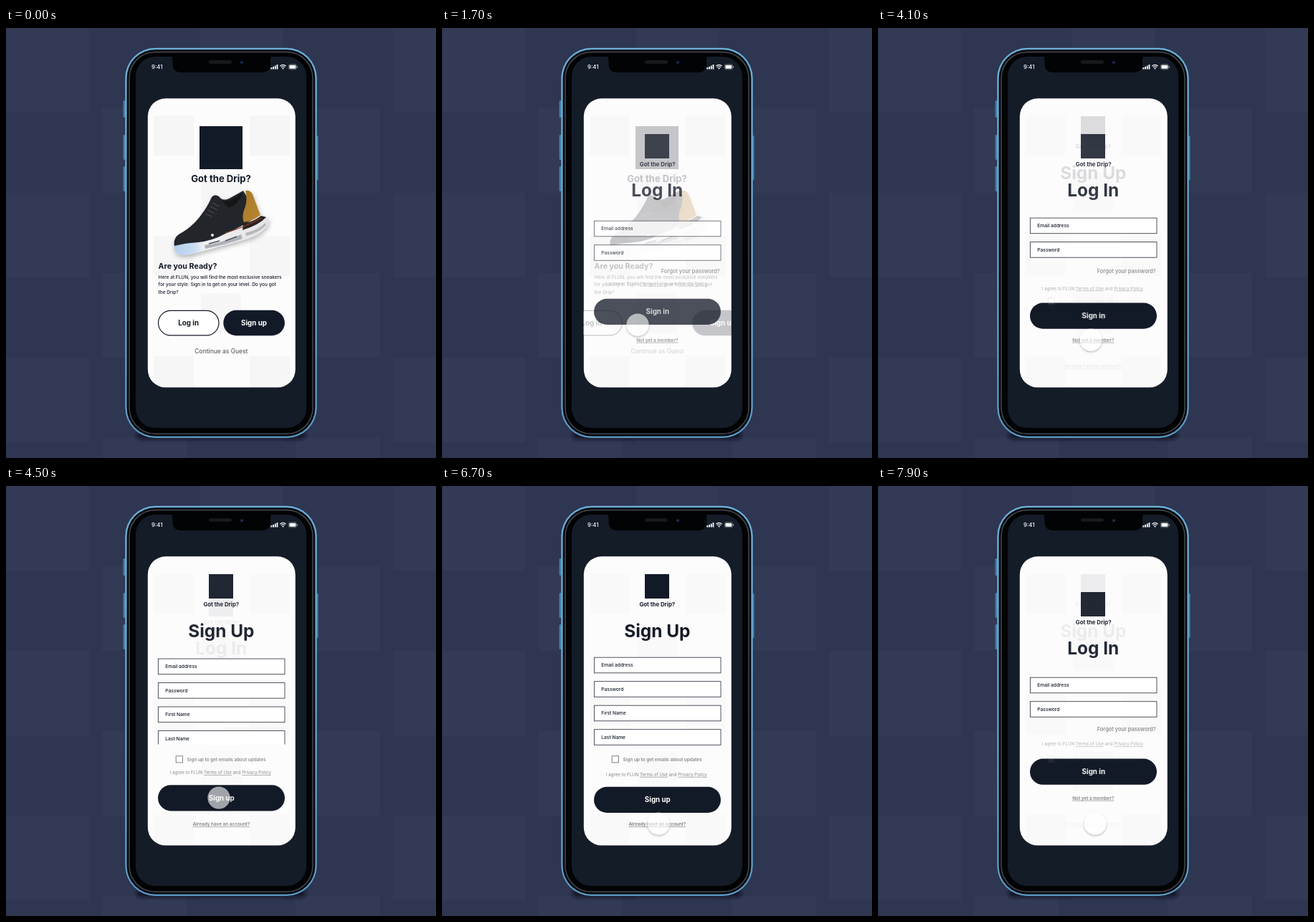
An HTML page that plays this animation: 600 px wide and 600 px high, repeating every 8 s.

```html
<!DOCTYPE html>
<html lang="en">
<head>
<meta charset="utf-8">
<title>Sneaker app sign in</title>
<style>
  /* --welcome: share of the first screen, --up: share of the sign-up form */
  @property --welcome { syntax: "<number>"; inherits: true; initial-value: 1; }
  @property --up { syntax: "<number>"; inherits: true; initial-value: 0; }

  html, body { margin: 0; width: 100%; height: 100%; overflow: hidden; background: #2e3652; }
  svg { display: block; width: 100vw; height: 100vh; animation: screens 8s linear infinite; }
  text { font-family: Inter, "Open Sans", sans-serif; fill: #131a27; }

  @keyframes screens {
    0%, 15.5% { --welcome: 1; animation-timing-function: ease-in-out; }
    24.2%, 100% { --welcome: 0; }
    0%, 49% { --up: 0; animation-timing-function: ease-in-out; }
    57.8% { --up: 1; }
    91.25% { --up: 1; animation-timing-function: cubic-bezier(.42, 0, .7, 1); }
    100% { --up: 0; }
  }

  .welcome { opacity: var(--welcome); }
  .login { opacity: calc((1 - var(--welcome)) * (1 - var(--up))); }
  .signup { opacity: var(--up); }
  .form { opacity: calc(1 - var(--welcome)); }
  .marks { opacity: calc(.012 + .013 * var(--welcome)); }

  .left { transform: translateX(calc((var(--welcome) - 1) * 60px)); }
  .right { transform: translateX(calc((1 - var(--welcome)) * 60px)); }
  .fields { transform: translateY(calc(var(--up) * -30px)); }
  .reveal { transform: translateY(calc(var(--up) * 38px)); }
  .terms { transform: translateY(calc(var(--up) * 45.5px)); opacity: calc(.6 + .4 * var(--up)); }
  .submit { transform: translateY(calc(var(--up) * 42px)); }

  .mid { text-anchor: middle; }
  .bold { font-weight: 700; }
  .title { font-size: 24.4px; font-weight: 700; }
  .tag { font-size: 7.8px; font-weight: 700; }
  .body { font-size: 6.5px; font-weight: 500; }
  .button { font-size: 9.8px; font-weight: 700; }
  .field { font-size: 6.65px; font-weight: 500; }
  .link { font-size: 6.4px; font-weight: 600; fill: #777a80; text-decoration: underline; }
  .grey { fill: #85878c; }
  .light { fill: #fff; }
  .under { text-decoration: underline; }

  .touch { animation: touch 8s linear infinite; }
  @keyframes touch {
    0%, 10.5% { opacity: 0; transform: translate(283px, 430px); animation-timing-function: ease-out; }
    14.5% { opacity: 1; transform: translate(273px, 414px); }
    26.5% { opacity: 1; transform: translate(273px, 414px); animation-timing-function: ease-in-out; }
    45% { opacity: 1; transform: translate(297px, 435px); }
    62% { opacity: 1; transform: translate(297px, 435px); animation-timing-function: ease-in-out; }
    80% { opacity: 1; transform: translate(302px, 471px); }
    100% { opacity: 1; transform: translate(303px, 471px); }
  }
</style>
</head>
<body>
<svg viewBox="0 0 600 600">
  <defs>
    <linearGradient id="edge" x1="0" x2="0" y1="0" y2="1">
      <stop offset="0" stop-color="#5a9fc9"/>
      <stop offset=".5" stop-color="#4c8fbb"/>
      <stop offset="1" stop-color="#3f7ca6"/>
    </linearGradient>
    <linearGradient id="gold" x1="0" x2="1" y1="0" y2="1">
      <stop offset="0" stop-color="#a97a2c"/>
      <stop offset="1" stop-color="#b8862f"/>
    </linearGradient>
    <linearGradient id="sole" x1="0" x2="1">
      <stop offset="0" stop-color="#b5cfee"/>
      <stop offset=".22" stop-color="#c9dcf2"/>
      <stop offset=".32" stop-color="#f1f1f3"/>
      <stop offset="1" stop-color="#e4e2e4"/>
    </linearGradient>
    <pattern id="stageMarks" width="270" height="230" patternUnits="userSpaceOnUse">
      <g fill="#fff">
        <rect x="-2" y="0" width="118" height="118"/>
        <rect x="134" y="112" width="118" height="118"/>
      </g>
    </pattern>
    <pattern id="cardMarks" x="198" y="98" width="134" height="168" patternUnits="userSpaceOnUse">
      <rect x="8" y="24" width="56" height="56"/>
      <rect x="74" y="104" width="56" height="56"/>
    </pattern>
    <filter id="soft" x="-50%" y="-50%" width="200%" height="200%">
      <feGaussianBlur stdDeviation="2.5"/>
    </filter>
    <filter id="drop" x="-50%" y="-50%" width="200%" height="200%">
      <feDropShadow dx="0" dy="1.5" stdDeviation="1.8" flood-color="#000" flood-opacity=".45"/>
    </filter>
    <filter id="shoeDrop" x="-20%" y="-20%" width="140%" height="150%">
      <feDropShadow dx="1" dy="3" stdDeviation="3" flood-color="#000" flood-opacity=".28"/>
    </filter>
    <clipPath id="card"><rect x="197.8" y="98.3" width="206" height="403.3" rx="25"/></clipPath>
    <clipPath id="reveal"><rect class="reveal" x="200" y="100" width="200" height="224.9"/></clipPath>
    <g id="box"><rect x="212.4" y="269.2" width="176.6" height="21.6" fill="#fff" stroke="#3a404b" stroke-width=".9"/></g>
  </defs>

  <rect width="600" height="600" fill="#2e3652"/>
  <rect width="600" height="600" fill="url(#stageMarks)" opacity=".018"/>

  <!-- phone -->
  <rect x="182" y="562" width="236" height="12" rx="6" fill="#0b0f1c" opacity=".75" filter="url(#soft)"/>
  <g fill="#4482aa">
    <rect x="163.6" y="101" width="3.4" height="24" rx="1.5"/>
    <rect x="163.6" y="149" width="3.4" height="35" rx="1.5"/>
    <rect x="163.6" y="193" width="3.4" height="35" rx="1.5"/>
    <rect x="433" y="150" width="2.6" height="62" rx="1.3"/>
  </g>
  <rect x="166.3" y="27.8" width="267.4" height="544.2" rx="42" fill="url(#edge)"/>
  <rect x="167.2" y="28.7" width="265.6" height="542.4" rx="41" fill="none" stroke="#86c4e6" stroke-width=".8"/>
  <rect x="168.7" y="30.2" width="262.6" height="539.4" rx="39.6" fill="#07090d"/>
  <rect x="172" y="33.5" width="256" height="532.8" rx="36.3" fill="none" stroke="#43484f" stroke-width="1.5"/>
  <rect x="173.4" y="35" width="253.2" height="529.8" rx="35" fill="#020304"/>
  <rect x="181" y="40" width="238" height="518" rx="27" fill="#141c28"/>
  <path d="M227 38 Q232.5 39 232.5 44 V50 Q232.5 62 244.5 62 H357 Q369 62 369 50 V44 Q369 39 374 38 Z" fill="#020304"/>
  <rect x="283" y="45" width="32" height="5" rx="2.5" fill="#17191d"/>
  <circle cx="329" cy="48" r="2.6" fill="#0d1830"/>
  <circle cx="329" cy="48" r="1" fill="#24447e"/>

  <!-- status bar -->
  <text class="light" x="203" y="57.2" font-size="7.8" font-weight="500">9:41</text>
  <g fill="#fff">
    <rect x="369.5" y="55" width="1.8" height="2.6" rx=".4"/>
    <rect x="372.2" y="53.8" width="1.8" height="3.8" rx=".4"/>
    <rect x="374.9" y="52.4" width="1.8" height="5.2" rx=".4"/>
    <rect x="377.6" y="51" width="1.8" height="6.6" rx=".4"/>
    <path d="M385 56 L386.5 57.8 L388 56 Q386.5 55 385 56 Z"/>
    <rect x="395.4" y="51.8" width="9" height="5" rx="1"/>
    <rect x="405.9" y="53.4" width="1" height="1.8" rx=".5"/>
  </g>
  <path d="M382.3 53.2 Q386.5 49.6 390.7 53.2 M383.8 54.9 Q386.5 52.6 389.2 54.9" fill="none" stroke="#fff" stroke-width="1.1"/>
  <rect x="394.3" y="50.7" width="11.2" height="7.2" rx="2" fill="none" stroke="#fff" stroke-opacity=".5" stroke-width=".6"/>

  <g clip-path="url(#card)">
    <rect x="197" y="98" width="208" height="405" fill="#fdfcfd"/>
    <rect class="marks" x="197" y="98" width="208" height="405" fill="url(#cardMarks)"/>

    <!-- first screen -->
    <g class="welcome">
      <rect x="270" y="137" width="60" height="60" fill="#131a27"/>
      <text class="mid bold" x="300" y="214.6" font-size="13.1">Got the Drip?</text>

      <g filter="url(#shoeDrop)">
        <path d="M234 302 Q235 314 241 316 Q254 318 268 313 L330 296 Q356 289 365 275 Q368 268 364 264 L354 261 L300 284 Z" fill="url(#sole)"/>
        <path d="M287 236 Q291 231 297 235 Q303 243 313 237 L331 227 L352 262 Q330 277 306 287 Q288 297 268 299 Q250 300 235 304 Q233 294 241 288 Q258 279 270 264 Q281 250 287 236 Z" fill="#24262b"/>
        <path d="M297 237 Q304 246 315 239 L330 230 Q325 246 311 251 Z" fill="#131519"/>
        <path d="M334 227 Q341 226 344 232 L355 261 Q345 269 332 271 Q328 263 334 249 Q337 238 334 227 Z" fill="url(#gold)"/>
        <path d="M331 273 Q346 270 356 262 L363 264 Q353 275 330 282 Z" fill="#2a2022"/>
        <path d="M306 286 Q335 277 357 265" fill="none" stroke="#8d3b28" stroke-width="1.2"/>
        <path d="M277 303 Q302 300 328 288 L330 294 Q304 303 278 308 Z" fill="#aeb0b8"/>
        <path d="M334 286 Q351 282 362 272 L363 275 Q353 286 335 290 Z" fill="#b9b7bd"/>
        <path d="M283 301 L298 297 M306 297 L322 291" stroke="#55575f" stroke-width="1.6"/>
        <path d="M282 254 l9 5 M285 249 l10 5 M288 244 l10 5 M278 259 l9 4" stroke="#484b52" stroke-width="1.3"/>
        <circle cx="288" cy="289" r="2" fill="#e8e8ea"/>
      </g>

      <text class="bold" x="212.6" y="335.6" font-size="10.7">Are you Ready?</text>
      <text class="body" y="349.7">
        <tspan x="212.6">Here at FLUN, you will find the most exclusive sneakers</tspan>
        <tspan x="212.6" dy="10.5">for your style. Sign in to get on your level. Do you got</tspan>
        <tspan x="212.6" dy="10.5">the Drip?</tspan>
      </text>
      <g class="left">
        <rect x="212.5" y="394.3" width="84.5" height="34.6" rx="17.3" fill="#fff" stroke="#131a27" stroke-width="1.2"/>
        <text class="button mid" x="254.6" y="415">Log in</text>
      </g>
      <g class="right">
        <rect x="303.3" y="393.8" width="85.6" height="35.4" rx="17.7" fill="#131a27"/>
        <text class="button mid light" x="346" y="415">Sign up</text>
      </g>
      <text class="mid" x="300.4" y="453.8" font-size="8.45" font-weight="500" style="fill:#5d6067">Continue as Guest</text>
    </g>

    <!-- headings and links -->
    <g class="signup">
      <rect x="283" y="123" width="34" height="34" fill="#131a27"/>
      <text class="tag mid" x="300.3" y="168">Got the Drip?</text>
      <text class="title mid" x="300.3" y="210.6">Sign Up</text>
      <text class="link mid" x="300.4" y="474.4">Already have an account?</text>
    </g>
    <g class="login">
      <rect x="283" y="148" width="34" height="34" fill="#131a27"/>
      <text class="tag mid" x="300.7" y="193">Got the Drip?</text>
      <text class="title mid" x="300.3" y="234.9">Log In</text>
      <text class="grey" x="387.8" y="341.6" font-size="7.4" font-weight="600" text-anchor="end">Forgot your password?</text>
      <text class="link mid" x="300.3" y="437.8">Not yet a member?</text>
    </g>

    <!-- shared form -->
    <g class="form">
      <g clip-path="url(#reveal)">
        <g class="fields">
          <use href="#box"/>
          <use href="#box" y="33.5"/>
          <use href="#box" y="67"/>
          <use href="#box" y="100.5"/>
          <text class="field" x="222.3" y="282.3">Email address</text>
          <text class="field" x="222.3" y="315.8">Password</text>
          <text class="field" x="222.3" y="349.3">First Name</text>
          <text class="field" x="222.3" y="382.8">Last Name</text>
        </g>
      </g>
      <g class="terms">
        <text class="grey mid" x="299.3" y="359.4" font-size="6.15">I agree to FLUN <tspan class="under">Terms of Use</tspan> and <tspan class="under">Privacy Policy</tspan></text>
      </g>
      <g class="submit">
        <rect x="212" y="377.8" width="177" height="36.2" rx="18.1" fill="#131a27"/>
        <text class="button mid light login" x="300.8" y="399.3">Sign in</text>
        <text class="button mid light signup" x="300.8" y="399.3">Sign up</text>
      </g>
      <g class="signup">
        <rect x="237.2" y="376.7" width="9.2" height="9.2" fill="#fff" stroke="#6d7077" stroke-width=".9"/>
        <text class="grey" x="252.6" y="383.8" font-size="6.4" font-weight="600">Sign up to get emails about updates</text>
      </g>
    </g>
  </g>

  <g class="touch">
    <g opacity=".6" filter="url(#drop)"><circle r="15.6" fill="#fff"/></g>
  </g>
</svg>
</body>
</html>
```
